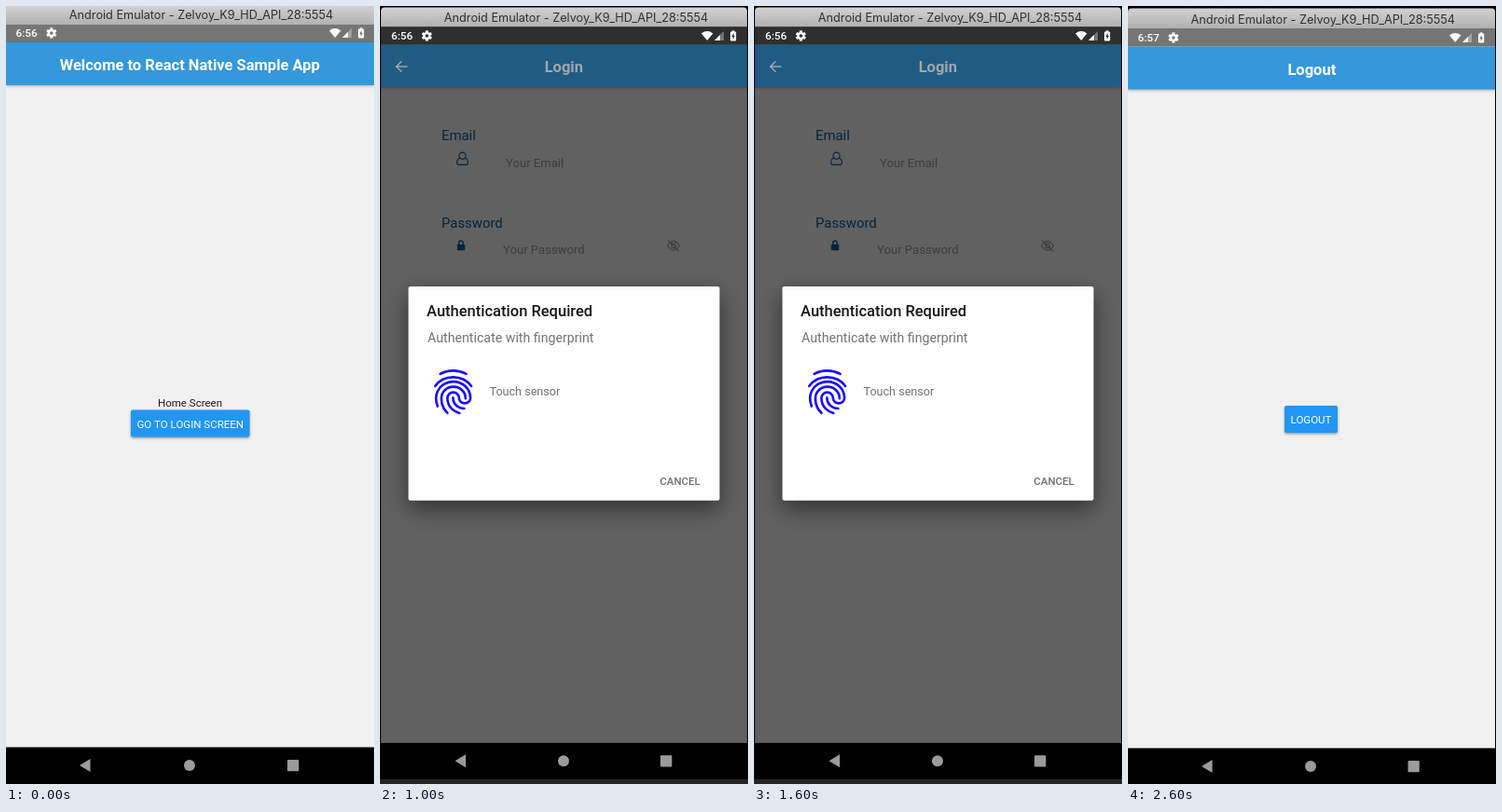
These frames come from a looping animation (395x835 px, 3000 ms). An HTML page with a canvas:

```html
<!DOCTYPE html>
<html lang="en">
<head>
<meta charset="utf-8">
<title>Login flow</title>
<style>
  html, body { margin: 0; width: 100%; height: 100%; overflow: hidden; background: #000; }
  canvas { display: block; width: 395px; height: 835px; }
</style>
</head>
<body>
<canvas id="stage"></canvas>
<script>
const W = 395, H = 835, STEP = 1000;
const canvas = document.getElementById('stage');
const ctx = canvas.getContext('2d');
const ratio = window.devicePixelRatio || 1;
canvas.width = W * ratio;
canvas.height = H * ratio;

const ROBOTO = 'Roboto, sans-serif';
const NAVY = '#04243b';
const WINDOW_TITLE = 'Android Emulator - Zelvoy_K9_HD_API_28:5554';

// Centre lines of the fingerprint ridges in a 24-unit box.
const RIDGES = [
  'M6.2 3.97C8 2.95 10 2.5 12 2.5s3.8.4 5.8 1.47',
  'M3.9 9.4C5.8 6.8 8.6 5.4 12 5.4s6.2 1.4 8.1 4',
  'M9.4 21.4c-.8-.8-1.2-1.3-1.8-2.4-.6-1.1-.9-2.5-.9-4.1 0-2.9 2.4-5.2 5.4-5.2s5.4 2.3 5.4 5.2',
  'M16.9 19.4c-1.1 0-2-.2-2.8-.8-1.4-.9-2.2-2.4-2.2-4',
  'M14.8 21.5c-1.4-.4-2.4-.9-3.4-1.9-1.3-1.3-2-3.1-2-4.9 0-1.4 1.2-2.5 2.6-2.5s2.6 1.1 2.6 2.5c0 1.3 1.1 2.4 2.5 2.4s2.6-1.1 2.6-2.4c0-4-3.4-7.3-7.7-7.3-3 0-5.8 1.7-7 4.3-.4.9-.7 1.9-.7 3 0 .8.1 2.1.7 3.7'
].map(d => new Path2D(d));

function rect(x, y, w, h, color) {
  ctx.fillStyle = color;
  ctx.fillRect(x, y, w, h);
}

function shape(color, points) {
  ctx.fillStyle = color;
  ctx.beginPath();
  points.forEach(([x, y]) => ctx.lineTo(x, y));
  ctx.closePath();
  ctx.fill();
}

function disc(x, y, r, color) {
  ctx.fillStyle = color;
  ctx.beginPath();
  ctx.arc(x, y, r, 0, 2 * Math.PI);
  ctx.fill();
}

function rounded(x, y, w, h, r, color) {
  ctx.fillStyle = color;
  ctx.beginPath();
  ctx.roundRect(x, y, w, h, r);
  ctx.fill();
}

function strokePath(d, color, width) {
  ctx.strokeStyle = color;
  ctx.lineWidth = width;
  ctx.stroke(new Path2D(d));
}

function withShadow(color, blur, dy, draw) {
  ctx.save();
  ctx.shadowColor = color;
  ctx.shadowBlur = blur * ratio;
  ctx.shadowOffsetY = dy * ratio;
  draw();
  ctx.restore();
}

function text(str, x, y, size, color, { weight = 400, align = 'left', family = ROBOTO } = {}) {
  ctx.font = `${weight} ${size}px ${family}`;
  ctx.textAlign = align;
  ctx.fillStyle = color;
  ctx.fillText(str, x, y);
}

function windowBar(x, y, w, h, radius, textX, baseline) {
  const shade = ctx.createLinearGradient(0, y, 0, y + h);
  shade.addColorStop(0, '#d2d2d2');
  shade.addColorStop(1, '#b0b0b0');
  rounded(x, y, w, h, [radius, radius, 0, 0], shade);
  text(WINDOW_TITLE, textX, baseline, 12.7, '#303030', { family: 'Inter, sans-serif' });
}

function gear(x, y, hole) {
  ctx.save();
  ctx.translate(x, y);
  for (let i = 0; i < 6; i++) {
    rect(-1.5, -5.6, 3, 4, '#fff');
    ctx.rotate(Math.PI / 3);
  }
  ctx.restore();
  disc(x, y, 4.1, '#fff');
  disc(x, y, 1.8, hole);
}

function statusIcons(x, cy, back) {
  ctx.fillStyle = '#fff';
  ctx.beginPath();
  ctx.moveTo(x + 6.2, cy + 5);
  ctx.lineTo(x, cy - 2.6);
  ctx.quadraticCurveTo(x + 6.2, cy - 7.4, x + 12.4, cy - 2.6);
  ctx.fill();

  shape('rgba(255,255,255,.35)', [[x + 14, cy + 5], [x + 24, cy + 5], [x + 24, cy - 5]]);
  shape('#fff', [[x + 14, cy + 5], [x + 20, cy + 5], [x + 20, cy - 1]]);

  rounded(x + 31, cy - 4.6, 6.2, 10, 1, '#fff');
  rect(x + 32.8, cy - 5.6, 2.6, 1.5, '#fff');
  shape(back, [[x + 34.7, cy - 3], [x + 32.3, cy + 1], [x + 33.7, cy + 1],
    [x + 33.7, cy + 4], [x + 36, cy], [x + 34.7, cy]]);
}

function statusBar(x, y, w, h, cy, time, timeX, iconX, color) {
  rect(x, y, w, h, color);
  text(time, timeX, cy + 4.2, 11.8, '#fff', { weight: 500 });
  gear(timeX + 38.3, cy, color);
  statusIcons(iconX, cy, color);
}

function appBar(x, y, w, h, title, baseline, color, ink) {
  withShadow('rgba(0,0,0,.3)', 3, 1, () => rect(x, y, w, h, color));
  text(title, 197.3, baseline, 16.5, ink, { weight: 700, align: 'center' });
}

function navBar(y, h, cy, backX, homeX, recentX, color) {
  rect(0, y, W, h, '#000');
  shape(color, [[backX, cy], [backX + 11.5, cy - 7], [backX + 11.5, cy + 7]]);
  disc(homeX, cy, 6, color);
  rounded(recentX, cy - 6, 12.3, 12.3, 1, color);
}

function button(x, y, w, h, label, baseline) {
  withShadow('rgba(0,0,0,.4)', 3, 1.3, () => rounded(x, y, w, h, 2, '#2196f3'));
  text(label, x + w / 2, baseline, 11.5, '#fff', { align: 'center' });
}

function homeScreen() {
  rect(0, 0, W, H, '#f1f1f1');
  windowBar(0, 0, W, 20, 0, 67.8, 14);
  statusBar(0, 20, W, 19, 29, '6:56', 10.5, 347, '#757575');
  appBar(0, 39, W, 46, 'Welcome to React Native Sample App', 69, '#3498db', '#fff');
  text('Home Screen', 197.5, 430.3, 11.5, '#1c1c1c', { align: 'center' });
  button(134, 433.5, 127.5, 29, 'GO TO LOGIN SCREEN', 453);
  navBar(795.5, 39.5, 815, 79, 197, 302, '#9b9b9b');
}

function loginForm() {
  text('Email', 66, 144, 14.9, NAVY);
  ctx.strokeStyle = NAVY;
  ctx.lineWidth = 1.1;
  ctx.beginPath();
  ctx.arc(88.5, 160.7, 3.6, 0, 2 * Math.PI);
  ctx.stroke();
  strokePath('M85.8 163.2C83.5 163.6 82.6 165.6 82.6 168.2Q82.6 170.4 84.6 170.4H92.4Q94.4 170.4 94.4 168.2C94.4 165.6 93.5 163.6 91.2 163.2', NAVY, 1.1);
  text('Your Email', 135, 173, 13.1, '#3d3d3d');

  text('Password', 66, 237.5, 14.9, NAVY);
  rounded(82.8, 256, 8.4, 6.3, 0.8, NAVY);
  strokePath('M84.7 256.5V254.3a2.3 2.3 0 0 1 4.6 0V256.5', NAVY, 1.4);
  text('Your Password', 132, 266.3, 13.1, '#3d3d3d');

  strokePath('M308.5 257.3Q315 247.5 321.5 257.3Q315 267 308.5 257.3Z', '#3d3d3d', 1.1);
  strokePath('M317.4 257.3a2.4 2.4 0 1 1 -4.8 0a2.4 2.4 0 1 1 4.8 0', '#3d3d3d', 1.1);
  strokePath('M309.3 251.4L321 263.3', '#3d3d3d', 1.2);
}

function fingerprint(x, y, scale) {
  ctx.save();
  ctx.translate(x, y);
  ctx.scale(scale, scale);
  ctx.strokeStyle = '#1c0cfa';
  ctx.lineWidth = 1.1;
  ctx.lineCap = 'round';
  RIDGES.forEach(ridge => ctx.stroke(ridge));
  ctx.restore();
}

function authDialog() {
  withShadow('rgba(0,0,0,.5)', 24, 9, () => rounded(30.5, 301, 334, 229.7, 2, '#fff'));
  text('Authentication Required', 50, 333, 16.5, '#161616', { weight: 500 });
  text('Authenticate with fingerprint', 51, 361.3, 14.2, '#737373');
  fingerprint(49.8, 385.4, 2.4);
  text('Touch sensor', 117.5, 418.3, 12.6, '#737373');
  text('CANCEL', 322, 513.5, 11.5, '#6e6e6e', { weight: 500, align: 'center' });
}

function loginScreen() {
  rect(0, 0, W, H, '#000');
  rect(1, 41, 393, 750, '#616161');
  windowBar(1, 1.5, 393, 21, 4, 68.8, 16.7);
  statusBar(1, 22.5, 393, 19, 32, '6:56', 12, 345, '#2f2f2f');
  appBar(1, 41.5, 393, 45.5, 'Login', 71, '#205b83', '#a0a6aa');
  strokePath('M29.5 65H18M23.3 59.2L17.5 65L23.3 70.8', '#a0a6aa', 1.5);
  loginForm();
  authDialog();
  navBar(791, 39, 810.3, 80.5, 197, 301, '#9b9b9b');
  rect(0, 830, W, 5, '#252525');
}

function logoutScreen() {
  rect(0, 0, W, H, '#000');
  rect(0, 43, 394, 754, '#f1f1f1');
  windowBar(0, 2.5, 394, 21.5, 4, 67.5, 19);
  statusBar(0, 24, 394, 19.5, 34, '6:57', 10.5, 345, '#757575');
  appBar(0, 43.5, 394, 46, 'Logout', 73.7, '#3498db', '#fff');
  button(168, 429, 57, 29, 'LOGOUT', 448);
  navBar(796.5, 38.5, 816, 79, 196, 300.5, '#9b9b9b');
  rect(394, 0, 1, H, '#000');
}

const screens = [homeScreen, loginScreen, logoutScreen];
const start = performance.now();

function frame() {
  const elapsed = Math.max(0, performance.now() - start);
  ctx.setTransform(ratio, 0, 0, ratio, 0, 0);
  screens[Math.floor(elapsed / STEP) % screens.length]();
  requestAnimationFrame(frame);
}
frame();
</script>
</body>
</html>
```
